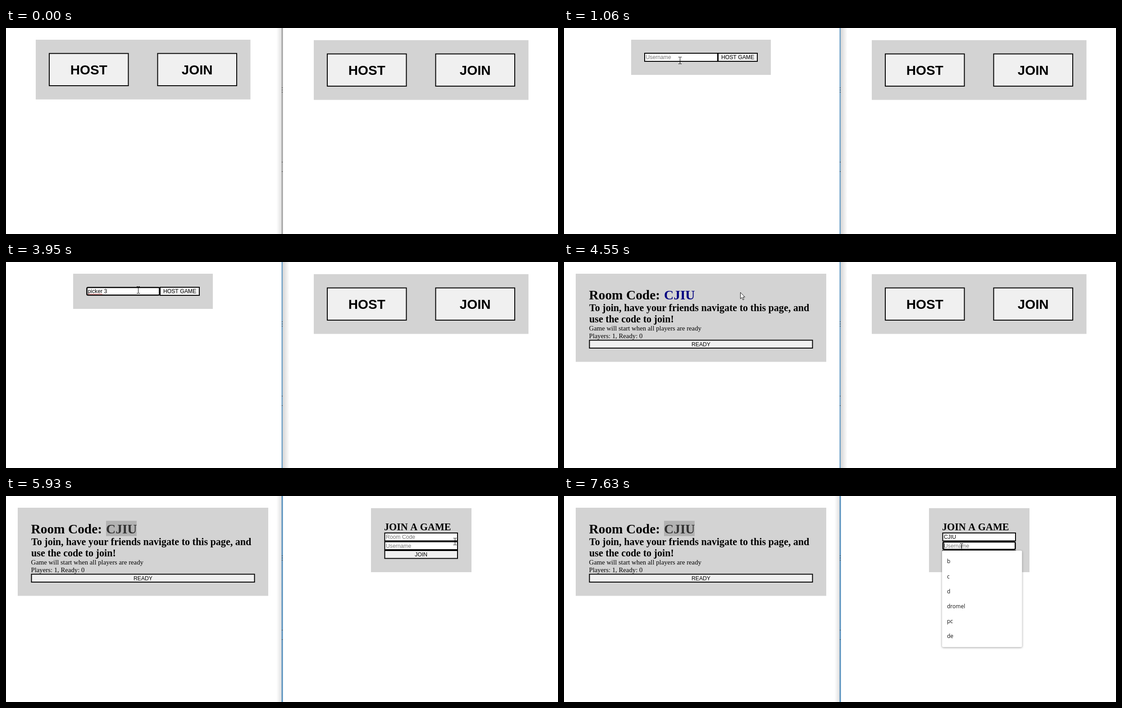
These frames come from a looping animation (1225x457 px, 8 s). An HTML page with a canvas:

```html
<!DOCTYPE html>
<html lang="en">
<head>
<meta charset="utf-8">
<title>Host and join a game</title>
<style>
html, body { margin: 0; width: 100%; height: 100%; overflow: hidden; background: #fff; }
canvas { display: block; }
</style>
</head>
<body>
<canvas id="stage" width="1225" height="457"></canvas>
<script>
const ctx = document.getElementById('stage').getContext('2d');
const LOOP = 8000, TICK = 76, BLINK = 535;
const SANS = '"Liberation Sans", Arial, sans-serif';
const SERIF = '"Liberation Serif", "Times New Roman", serif';
const MENU = '"Open Sans", "Noto Sans", sans-serif';
const HEADING = `bold 22.1px ${SERIF}`;

// Moments at which the interface changes, in ms
const AT = {
  leftActive: 600, hostForm: 680, hostFocus: 1300, room: 4400, select: 4940,
  rightActive: 5700, joinForm: 5770, codeFocus: 6330, paste: 6970, nameFocus: 7470
};
const TYPED = 'picker 3';
const KEY_TIMES = [2700, 2840, 2920, 3000, 3170, 3250, 3320, 3400];
const HOST_NAMES = ['a', 'pevlo', 'zxcv', 's', 'd', 'jorilu'];
const JOIN_NAMES = ['b', 'c', 'd', 'dromel', 'pc', 'de'];

// Pointer path: time, x, y
const PATH = [
  [70, 1060, 250], [300, 620, 150], [530, 215, 100], [690, 215, 100], [830, 236, 92],
  [910, 246, 84], [1060, 256, 72], [1290, 285, 64], [3880, 285, 64], [3950, 293, 62],
  [4020, 293, 62], [4330, 388, 66], [4400, 388, 66], [4550, 391, 67], [4570, 391, 67],
  [4860, 262, 76], [4980, 262, 76], [5130, 450, 130], [5350, 800, 140], [5550, 1027, 95],
  [5760, 1027, 95], [5925, 996, 101], [5940, 996, 101], [6330, 872, 88], [6480, 869, 86],
  [6560, 883, 93], [7040, 883, 93], [7390, 882, 113]
];

function text(str, x, y, font, color = '#000', align = 'left') {
  ctx.font = font;
  ctx.fillStyle = color;
  ctx.textAlign = align;
  ctx.fillText(str, x, y);
}

function rect(x, y, w, h, color) {
  ctx.fillStyle = color;
  ctx.fillRect(x, y, w, h);
}

const panel = (x, y, w, h) => rect(x, y, w, h, '#d3d3d3');

function bordered(x, y, w, h, fill) {
  rect(x, y, w, h, '#000');
  rect(x + 2, y + 2, w - 4, h - 4, fill);
}

function button(x, y, w, h, label, font, baseline) {
  bordered(x, y, w, h, '#f0f0f0');
  text(label, x + w / 2, baseline, font, '#000', 'center');
}

const smallButton = (x, y, w, h, label) => button(x, y, w, h, label, `12.2px ${SANS}`, y + 14);

function input(x, y, w, h, value, placeholder, focusAge = -1) {
  const focused = focusAge >= 0;
  if (focused) {
    ctx.beginPath();
    ctx.roundRect(x + 1.5, y + 1.5, w - 3, h - 3, 2.5);
    ctx.fillStyle = '#fff';
    ctx.strokeStyle = '#000';
    ctx.lineWidth = 2.6;
    ctx.fill();
    ctx.stroke();
  } else {
    bordered(x, y, w, h, '#fff');
  }
  text(value || placeholder, x + 3.5, y + 14, `12.2px ${SANS}`, value ? '#000' : '#757575');
  if (focused && Math.floor(focusAge / BLINK) % 2 === 0) {
    const caret = value ? Math.round(ctx.measureText(value).width) : 0;
    rect(Math.floor(x) + 4 + caret, y + 3, 1, 14, '#000');
  }
}

function squiggle(x, y, width) {
  ctx.beginPath();
  for (let i = 0; i <= width; i += 2) ctx.lineTo(x + i, y + (i / 2 % 2 ? 1.5 : 0));
  ctx.strokeStyle = '#f03030';
  ctx.lineWidth = 0.8;
  ctx.stroke();
}

function dropdown(x, y, names) {
  ctx.save();
  ctx.shadowColor = 'rgba(0,0,0,.4)';
  ctx.shadowBlur = 4;
  ctx.shadowOffsetY = 1;
  ctx.fillStyle = '#fff';
  ctx.beginPath();
  ctx.roundRect(x, y, 177.5, 15 + 33.2 * names.length, 3);
  ctx.fill();
  ctx.restore();
  names.forEach((name, i) => text(name, x + 11, Math.round(y + 28.3 + 33.2 * i), `12px ${MENU}`, '#111'));
}

function menuScreen(x, y) {
  panel(x, y, 476.5, 132.5);
  const font = `bold 29.5px ${SANS}`;
  button(x + 29, y + 29.5, 177.5, 73.5, 'HOST', font, y + 76.5);
  button(x + 269.5, y + 29.5, 177.5, 73.5, 'JOIN', font, y + 76.5);
}

function hostScreen(t) {
  panel(149, 26, 310, 78);
  const count = KEY_TIMES.filter(k => t >= k).length;
  const focusStart = count ? KEY_TIMES[count - 1] : AT.hostFocus;
  smallButton(341, 55, 89, 20, 'HOST GAME');
  input(178, 55, 164, 20, TYPED.slice(0, count), 'Username', t - focusStart);
  if (count > 6) squiggle(182, 70.5, 33);
  if (t >= AT.hostFocus && count < 2) dropdown(177, 76, count ? [HOST_NAMES[1]] : HOST_NAMES);
}

function roomScreen(t) {
  panel(26, 26, 556, 195.5);
  const title = `bold 29.4px ${SERIF}`, body = `14.75px ${SERIF}`;
  const selected = t >= AT.select, inactive = t >= AT.rightActive;
  text('Room Code:', 55.5, 82.5, title);
  if (selected) rect(222, 55, 68, 34, inactive ? '#b2b2b2' : '#1a80d6');
  text('CJIU', 222, 82.5, title, !selected ? '#000080' : inactive ? '#323232' : '#fff');
  text('To join, have your friends navigate to this page, and', 56, 109, HEADING);
  text('use the code to join!', 56, 134, HEADING);
  text('Game will start when all players are ready', 55.5, 152, body);
  text('Players: 1, Ready: 0', 55.5, 169, body);
  smallButton(55.5, 172.5, 497, 19.5, 'READY');
}

function joinScreen(t) {
  panel(810, 27, 223, 142);
  text('JOIN A GAME', 839, 76, HEADING);
  const onName = t >= AT.nameFocus, pasted = t >= AT.paste;
  smallButton(839.5, 120, 163.5, 19.5, 'JOIN');
  input(839.5, 81, 163.5, 19.5, pasted ? 'CJIU' : '', 'Room Code',
    onName ? -1 : t - (pasted ? AT.paste : AT.codeFocus));
  input(839.5, 100.5, 163.5, 19.5, '', 'Username', t - AT.nameFocus);
  if (onName) dropdown(839, 121, JOIN_NAMES);
}

function divider(t) {
  const left = t >= AT.leftActive && t < AT.rightActive;
  const right = t >= AT.rightActive;
  const [from, to] = left ? [614, 629] : [612, 600];
  const shade = ctx.createLinearGradient(from, 0, to, 0);
  shade.addColorStop(0, `rgba(0,0,0,${left ? .16 : .12})`);
  shade.addColorStop(1, 'rgba(0,0,0,0)');
  rect(Math.min(from, to), 0, Math.abs(to - from), 457, shade);
  rect(611.5, 0, left ? 2.5 : 3, 457, left ? '#6b9ec6' : right ? '#5690bd' : '#a2a2a2');
  for (const y of [132, 137, 142, 297, 318]) rect(612, y, 2, 1, '#333');
}

function pointerAt(t) {
  const i = PATH.findIndex(p => p[0] > t);
  if (i < 0) return PATH[PATH.length - 1].slice(1);
  const [t0, x0, y0] = PATH[i - 1], [t1, x1, y1] = PATH[i];
  const k = (t - t0) / (t1 - t0);
  return [Math.round(x0 + (x1 - x0) * k), Math.round(y0 + (y1 - y0) * k)];
}

function pointerKind(t, x, y) {
  const inside = (l, top, r, b) => x >= l && x < r && y >= top && y < b;
  const overMenu = (l, top) => inside(l + 29, top + 29, l + 207, top + 103) || inside(l + 269, top + 29, l + 447, top + 103);
  if (t < AT.hostForm && overMenu(66, 26) || t < AT.joinForm && overMenu(683, 27)) return 'hand';
  if (t >= AT.hostForm && t < AT.room) {
    if (inside(178, 55, 342, 82)) return 'beam';
    if (inside(342, 55, 430, 75)) return 'hand';
  }
  if (t >= AT.room && inside(56, 55, 290, 90)) return 'beam';
  if (t >= AT.joinForm && inside(839, 81, 1003, 120)) return 'beam';
  return 'arrow';
}

const ARROW = new Path2D('M.5 .5V14.5L3.7 11.5 6 17 8.3 16 6.1 10.8H10.5Z');
const HAND = new Path2D('M-1 1Q1-1 3 1V7Q5 5 6 7.5 8 6 9 8.5 11 7 12 10V15L10 20H1L-4 13Q-5 10-1 12Z');

function pointer(t) {
  const step = Math.floor((t + 12) / TICK) * TICK;
  if (step < PATH[0][0]) return;
  const [x, y] = pointerAt(step);
  const kind = pointerKind(t, x, y);
  ctx.save();
  ctx.translate(x, y);
  if (kind === 'beam') {
    rect(0, -7, 1, 14, '#000');
    for (const end of [-8, 7]) {
      rect(-3, end, 3, 1, '#000');
      rect(1, end, 3, 1, '#000');
    }
  } else {
    const shape = kind === 'hand' ? HAND : ARROW;
    ctx.fillStyle = '#fff';
    ctx.strokeStyle = '#111';
    ctx.lineWidth = 1;
    ctx.fill(shape);
    ctx.stroke(shape);
  }
  ctx.restore();
}

function draw(t) {
  rect(0, 0, 1225, 457, '#fff');
  divider(t);
  if (t < AT.hostForm) menuScreen(66, 26);
  else if (t < AT.room) hostScreen(t);
  else roomScreen(t);
  if (t < AT.joinForm) menuScreen(683, 27);
  else joinScreen(t);
  pointer(t);
}

const start = performance.now();
function frame() {
  draw((performance.now() - start) % LOOP);
  requestAnimationFrame(frame);
}
frame();
</script>
</body>
</html>
```
